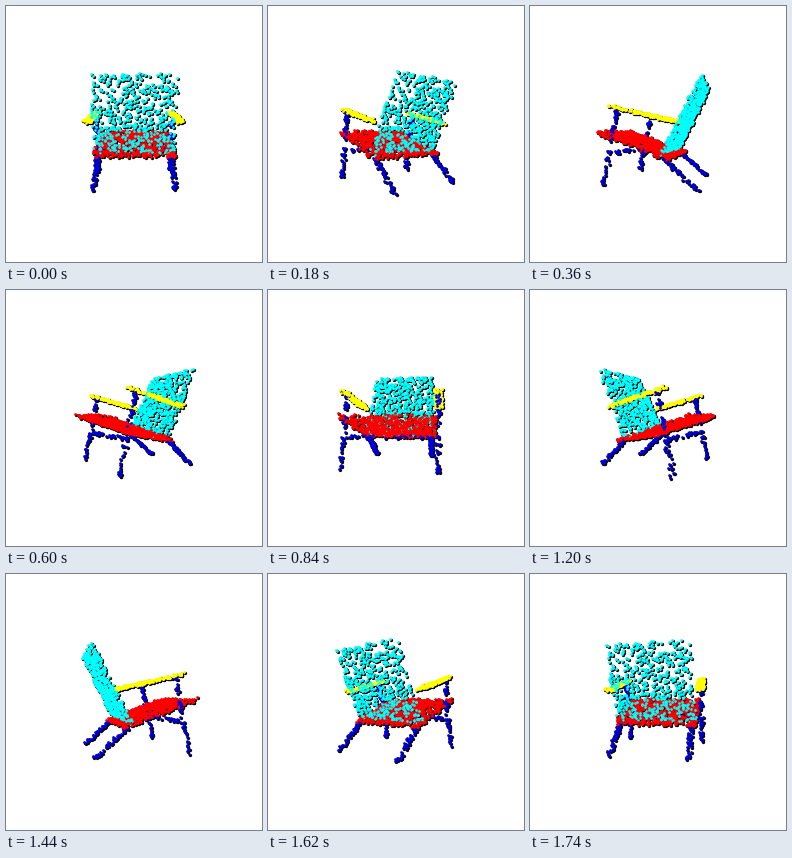
These frames come from a looping animation (256x256 px, 1.8 s). A matplotlib script:

```python
import numpy as np
import matplotlib.pyplot as plt
from matplotlib.animation import FuncAnimation

SIZE, DPI = 256, 100
FRAMES, STEP = 30, 60
EYE = 220                  # camera distance
CX, CY = 128, 125.5        # projected centre
FLOOR, TOP = -47, 46       # vertical extent of the chair

CYAN, RED, BLUE, YELLOW = "cyan", "red", "#0000d8", "yellow"

rng = np.random.default_rng(7)


def bar(n, start, end, spread):
    """Points scattered around a line between two (side, forward, up) ends."""
    t = rng.random((n, 1))
    core = (1 - t) * np.array(start) + t * np.array(end)
    return core + rng.uniform(-1, 1, (n, 3)) * spread


def sheet(n, start, end, spread):
    """Like bar, but swept sideways to both sides of the middle plane."""
    points = bar(n, start, end, spread)
    points[:, 0] *= rng.uniform(-1, 1, n)
    return points


def build():
    """Return the chair as (color, points) parts."""
    seat_rear = np.array([38, -21, -23])
    arm_front = np.array([42, 31, 22])
    mirror = np.array([-1, 1, 1])

    yield CYAN, sheet(600, (34.5, -47, TOP), (38.5, -13, -21), (0, 1.6, 0.5))
    yield RED, sheet(700, (42, 48, 0), seat_rear, (0, 0.5, 1.6))
    yield BLUE, sheet(30, (40, 28, -19), (40, 28, -19), (0, 1.5, 1.5))
    for side in (mirror, 1):
        yield YELLOW, bar(130, side * arm_front, side * np.array([42, -27, 8]),
                          (3.6, 1, 1.2))
        yield BLUE, bar(50, side * (arm_front - [0, 8, 3]),
                        side * np.array([42, 37, FLOOR]), (1.9, 1.7, 1))
        yield BLUE, bar(45, side * (seat_rear + [-4, 5, 0]),
                        side * np.array([33, -44, FLOOR]), (2, 1.7, 1))


parts = list(build())
points = np.vstack([p for _, p in parts])
colors = np.vstack([np.tile(plt.matplotlib.colors.to_rgb(c), (len(p), 1))
                    for c, p in parts])

fig = plt.figure(figsize=(SIZE / DPI, SIZE / DPI), dpi=DPI, facecolor="white")
ax = fig.add_axes([0, 0, 1, 1])
ax.set(xlim=(0, SIZE), ylim=(SIZE, 0))
ax.axis("off")


def dot_layer(diameter, color):
    return ax.scatter(points[:, 0], points[:, 1], c=color, linewidths=0,
                      s=(diameter * 72 / DPI) ** 2)


rims = dot_layer(3.3, "black")
dots = dot_layer(2.7, colors)


def update(i):
    a = 2 * np.pi * i / FRAMES
    side, fwd, up = points.T
    x = side * np.cos(a) - fwd * np.sin(a)
    near = -side * np.sin(a) - fwd * np.cos(a)
    scale = EYE / (EYE - near)
    xy = np.floor(np.c_[CX + x * scale, CY - up * scale]) + 0.5
    order = np.argsort(near)
    rims.set_offsets(xy)
    dots.set_offsets(xy[order])
    dots.set_facecolors(colors[order])
    return rims, dots


anim = FuncAnimation(fig, update, frames=FRAMES, interval=STEP,
                     repeat=True, repeat_delay=0)
plt.show()
```
